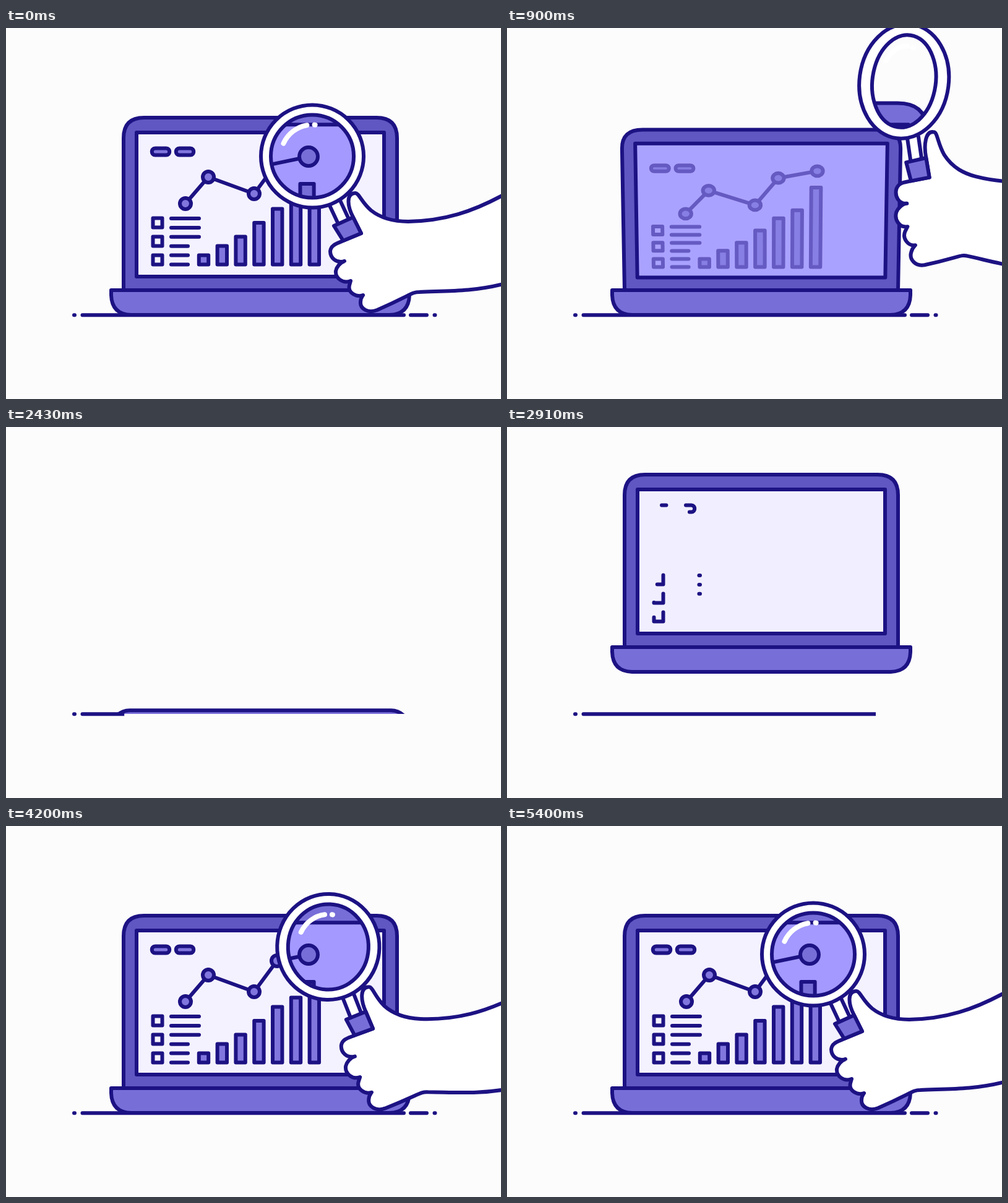
These frames come from a looping animation (800 by 600 pixels, 5430 ms). An HTML page with a canvas:

```html
<!DOCTYPE html>
<html lang="en">
<head>
<meta charset="utf-8">
<title>Chart inspection</title>
<style>
html, body { margin: 0; width: 100%; height: 100%; overflow: hidden; background: #fcfcfc; }
canvas { display: block; width: 800px; height: 600px; }
</style>
</head>
<body>
<canvas id="stage" width="800" height="600"></canvas>
<script>
const ctx = document.getElementById('stage').getContext('2d');
const LOOP = 5430, DONE = 1e9;
const BG = '#fcfcfc', INK = '#1d1283', LID = '#6057c2', BASE = '#786ed8',
      SCREEN = '#f4f2ff', TINT = '#a399ff', DIM = '#aaa2ff', FILL = '#8076dd';

const clamp = v => Math.max(0, Math.min(1, v));
const ramp = (t, from, len) => clamp((t - from) / len);
const smooth = p => p * p * (3 - 2 * p);
const easeOut = p => 1 - (1 - p) ** 2;
const backOut = p => { const u = p - 1; return p ? 1 + 3.6 * u ** 3 + 2.6 * u * u : 0; };
const lerp = (a, b, p) => a + (b - a) * p;

function mix(a, b, p) {
  const part = (c, i) => parseInt(c.slice(1 + i * 2, 3 + i * 2), 16);
  const hex = i => Math.round(lerp(part(a, i), part(b, i), p)).toString(16).padStart(2, '0');
  return '#' + hex(0) + hex(1) + hex(2);
}

function paint(path, fill, stroke = INK, width = 6) {
  if (fill) { ctx.fillStyle = fill; ctx.fill(path); }
  ctx.strokeStyle = stroke;
  ctx.lineWidth = width;
  ctx.stroke(path);
}

function poly(map, pts, closed) {
  const path = new Path2D();
  pts.forEach(p => path.lineTo(...map(...p)));
  if (closed) path.closePath();
  return path;
}

function box(map, x, y, w, h) {
  return poly(map, [[x + w, y], [x + w, y + h], [x, y + h], [x, y]], true);
}

// Draws the first part p of an outline of the given length
function trim(path, length, p, fill, ink) {
  if (p <= 0) return;
  if (p < 1) ctx.setLineDash([length * p, 9999]);
  paint(path, p < 1 ? null : fill, ink);
  ctx.setLineDash([]);
}

function lidPath(map) {
  const path = new Path2D(), r = 33;
  path.moveTo(...map(190, 426));
  path.lineTo(...map(190, 145 + r));
  path.quadraticCurveTo(...map(190, 145), ...map(190 + r, 145));
  path.lineTo(...map(632 - r, 145));
  path.quadraticCurveTo(...map(632, 145), ...map(632, 145 + r));
  path.lineTo(...map(632, 426));
  path.closePath();
  return path;
}

function pillPath(map, x, y) {
  const path = new Path2D();
  const side = s => {
    path.lineTo(...map(x + 9 * s, y - 5.5 * s));
    path.bezierCurveTo(...map(x + 16 * s, y - 5.5 * s), ...map(x + 16 * s, y + 5.5 * s), ...map(x + 9 * s, y + 5.5 * s));
  };
  path.moveTo(...map(x, y - 5.5));
  side(1);
  side(-1);
  path.closePath();
  return path;
}

const points = [[290, 284], [327, 241], [401, 268], [438, 218], [500, 205]];
const barSizes = [1, 2, 3, 4.5, 6, 7, 9.8];
const screenPath = map => box(map, 211, 169, 400, 233);

function chart(map, sx, sy, t, ink, fill) {
  for (let i = 0; i < 2; i++)
    trim(pillPath(map, 250 + i * 39, 200), 68, ramp(t, 2898 - i * 38, 120), fill, ink);
  for (let i = 0; i < 3; i++)
    trim(box(map, 237.5, 307.5 + i * 30, 15, 15), 60, ramp(t, 2878 - i * 8, 80), null, ink);
  for (let i = 0; i < 6; i++) {
    const y = 308 + i * 14.9, end = i < 3 ? 312 : 294;
    trim(poly(map, [[end, y], [267, y]]), end - 267, ramp(t, i < 3 ? 2904 : 2960, 200), null, ink);
  }
  barSizes.forEach((size, i) => {
    const h = 15 * size * backOut(ramp(t, 3204 + i * 58, 450));
    if (h) paint(box(map, 311.8 + i * 29.8, 382.5 - h, 15.4, h), fill, ink);
  });
  trim(poly(map, points), 261, ramp(t, 3300, 380), null, ink);
  points.forEach(([x, y], i) => {
    const r = 9 * easeOut(ramp(t, 3480 + i * 44, 160));
    if (!r) return;
    const dot = new Path2D();
    dot.ellipse(...map(x, y), r * sx, r * sy, 0, 0, 7);
    paint(dot, fill, ink);
  });
}

// How far the lid stands open, and how far the laptop is from the ground
function laptopPose(t) {
  if (t < 2300) return [1 - .85 * ramp(t, 710, 490) ** 2.65, 95 * smooth(ramp(t, 1250, 400))];
  const open = lerp(.15, 1, smooth(ramp(t, 2480, 320)));
  const dy = t < 2885 ? lerp(95, -69, smooth(ramp(t, 2310, 575)))
    : -69 * (1 - ramp(t, 2885, 215) ** 2) - 5 * Math.sin(Math.PI * ramp(t, 3100, 140));
  return [open, dy];
}

function laptop(t) {
  const [open, dy] = laptopPose(t), closing = t < 2300;
  if (dy > 90) return;
  ctx.save();
  ctx.beginPath();
  ctx.rect(0, 0, 800, dy > 0 ? 464 : 600);
  ctx.clip();
  if (open < .2) {
    const slab = new Path2D();
    slab.roundRect(170, 382 + dy, 482, 42, [30, 30, 0, 0]);
    paint(slab, BASE);
  } else {
    const wide = Math.min(.09, .3 * (1 - open));
    const squash = Math.max(0, 1 - 1.8 * (1 - open));
    const mapX = (x, y) => 411 + (x - 411) * (1 + wide * (424 - y) / 279);
    const mapY = y => 424 - (424 - y) * open + dy;
    const map = (x, y) => [mapX(x, y), mapY(y)];
    const flat = (x, y) => [mapX(x, y), mapY(402) - (402 - y) * squash];
    const dim = closing ? ramp(t, 600, 280) : 1 - smooth(ramp(t, 2560, 400));
    const fade = closing ? ramp(t, 600, 600) : 0;
    const screen = mix(SCREEN, DIM, dim);
    paint(lidPath(map), LID);
    paint(screenPath(map), screen);
    if (fade < 1 && (closing || t > 2840))
      chart(flat, 1 + wide, squash, closing ? DONE : t, mix(INK, screen, fade), mix(FILL, screen, fade * .4));
  }
  ctx.translate(0, dy);
  paint(new Path2D('M170 424H652V432Q651 463 620 464H202Q171 463 170 432Z'), BASE);
  ctx.restore();
}

function ground(t) {
  const erasing = t < 2290;
  const start = 106 + (erasing ? 592 * ramp(t, 1730, 550) : 0);
  const end = 106 + 592 * (erasing ? 1 : ramp(t, 2330, 702));
  ctx.save();
  ctx.beginPath();
  ctx.rect(start, 455, end - start, 20);
  ctx.clip();
  paint(new Path2D('M110 464.3h1M123.5 464.3H643M654 464.3H680M692.5 464.3h1'));
  ctx.restore();
}

const armPath = new Path2D(`M574 332L561 306C552 289 549 268 564 267C570 266 574 281 590 295
  C609 310 630 313 650 313C710 312 755 296 800 272L1200 60V310L800 415C755 426 715 425 668 427
  C655 427 655 432 600 456C585 462 572 454 573 443C573 437 575 435 577 432C566 436 552 428 555 416
  L557 409C545 414 532 405 533 393C534 387 540 379 547 377C534 381 524 372 524 361C525 350 537 348 545 344Z`);
const stemPath = new Path2D('M523 287L538 319L554 309L540 279');
const gripPath = new Path2D('M530 320L561 306L574 332L545 344Z');

function arc(r, from = 0, to = Math.PI * 2) {
  const path = new Path2D();
  path.arc(0, 0, r, from, to);
  return path;
}
const ring = arc(83), lens = arc(67), glare = arc(51, -2.72, -1.74), spark = arc(51, -1.5, -1.48);
const HOME = { x: 495, y: 207.5 };

// Lens centre, size, and a lean that turns and stretches the whole hand
function handPose(t) {
  if (t < 2000) {
    const v = t / 900, rise = v ** 3;
    return { x: HOME.x + 146 * v ** 4.5, y: HOME.y - 121 * rise, lean: .12 * rise, size: 1 };
  }
  const d = Math.exp((3660 - t) / 307), near = Math.min(d, 1.2);
  const home = smooth(ramp(t, 4740, 630));
  return {
    x: lerp(452 + 401 * d, HOME.x, home),
    y: lerp(233 - 108 * d ** .6, HOME.y, home),
    lean: lerp(.26 * near - .02, 0, home),
    size: lerp(1 + .2 * near * near, 1, home)
  };
}

function magnified() {
  const zoom = 1.44, map = (x, y) => [489 + zoom * (x - 500), 208 + zoom * (y - 205)];
  ctx.fillStyle = BG;
  ctx.fillRect(0, 0, 800, 600);
  paint(lidPath(map), BASE);
  paint(screenPath(map), TINT);
  chart(map, 1.66, 1.66, DONE, INK, BASE);
}

function hand(t) {
  if (t > 1170 && t < 3450) return;
  const { x, y, lean, size } = handPose(t);
  const tilted = new DOMMatrix().translate(x, y).rotate(62 * lean)
    .scale(size * (1 - .4 * lean), size * (1 + lean));
  const body = tilted.rotate(56 * lean).translate(-HOME.x, -HOME.y);
  const rim = tilted.scale(Math.max(.1, 1 - 50 * Math.abs(lean) ** 3), 1);
  const glass = rim.scale(1 - Math.abs(lean), 1).rotate(56 * lean);
  const place = (path, m) => { const out = new Path2D(); out.addPath(path, m); return out; };
  const pane = place(lens, glass);

  paint(place(stemPath, body), '#ffffff');
  paint(place(ring, rim), '#ffffff');
  ctx.save();
  ctx.clip(pane);
  magnified();
  ctx.restore();
  paint(pane);
  paint(place(glare, glass), null, '#ffffff', 8);
  paint(place(spark, glass), null, '#ffffff', 8);
  paint(place(armPath, body), '#ffffff');
  paint(place(gripPath, body), BASE);
}

function draw(t) {
  ctx.fillStyle = BG;
  ctx.fillRect(0, 0, 800, 600);
  ctx.lineCap = ctx.lineJoin = 'round';
  laptop(t);
  ground(t);
  hand(t);
}

const begin = performance.now();
function tick() {
  draw((performance.now() - begin) % LOOP);
  requestAnimationFrame(tick);
}
tick();
</script>
</body>
</html>
```
